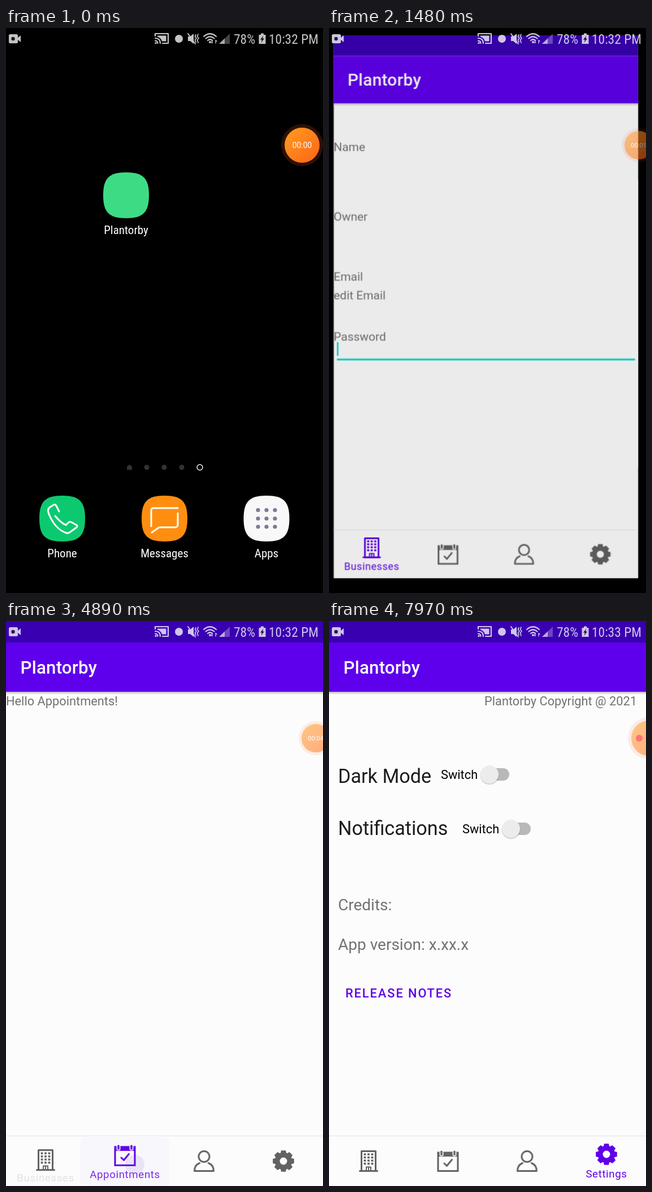
Write an HTML page that moves like this. It is 561 px wide and 998 px high and loops after 8000 ms.

```html
<!DOCTYPE html>
<html lang="en">
<head>
<meta charset="utf-8">
<title>Appointment app demo</title>
<style>
  html, body { margin: 0; width: 100%; height: 100%; overflow: hidden; background: #000; }
  svg { display: block; width: 100vw; height: 100vh; font: 21.8px Roboto, sans-serif; }
  .condensed { font-family: "Roboto Condensed", Roboto, sans-serif; font-stretch: 75%; }
  .line { fill: none; stroke: currentColor; stroke-linecap: round; stroke-linejoin: round; }
  .middle { text-anchor: middle; }
  .end { text-anchor: end; }
  .grey { fill: #727272; }
  .medium { font-weight: 500; }
  #home, #app { transform-origin: 212px 328px; }
  #status { color: #fff; fill: #fff; opacity: .77; }
</style>
</head>
<body>
<svg id="stage" viewBox="0 0 561 998" preserveAspectRatio="none"></svg>
<script>
const LOOP = 8000;
const APP_NAME = 'Plantorby';
const PURPLE = '#5f00e8';
const PAPER = '#fcfcfc';

const text = (x, y, str, cls = 'grey', extra = '') =>
  `<text x="${x}" y="${y}" class="${cls}" ${extra}>${str}</text>`;
const line = (d, width = 3, extra = '') =>
  `<path class="line" d="${d}" stroke-width="${width}" ${extra}/>`;
const rect = (x, y, w, h, fill, extra = '') =>
  `<rect x="${x}" y="${y}" width="${w}" height="${h}" fill="${fill}" ${extra}/>`;
const circle = (x, y, r, fill, extra = '') =>
  `<circle cx="${x}" cy="${y}" r="${r}" fill="${fill}" ${extra}/>`;
const repeat = (list, make) => list.map(make).join('');

// Home screen
const launcher = (x, y, color, label, glyph = '') => `
  <path transform="translate(${x} ${y})" fill="${color}"
    d="M0-40.5C30-40.5 40.5-30 40.5 0S30 40.5 0 40.5-40.5 30-40.5 0-30-40.5 0-40.5Z"/>
  <g color="#fff">${glyph}</g>
  ${text(x, y + 68.5, label, 'condensed middle', 'fill="#fff" font-size="21"')}`;

const phoneGlyph = line('M94 854L89 844Q87 840 83 843L77 847Q72 851 77 861C84 877 95 888 107 892Q111 893 114 890' +
  'L125 882Q128 879 123 877L116 873Q112 871 110 874L106 878Q97 874 87 862');
const messageGlyph = line('M304 848H261Q257 848 257 852V880M304 857V877Q304 882 299 882H271L258 891');
const gridGlyph = repeat([446, 461, 476], x =>
  repeat([851.5, 866.5, 881], y => circle(x, y, 3.6, '#7b7b98')));

const home = `<g id="home">
  ${launcher(212.5, 295.5, '#3ddc84', APP_NAME)}
  <path d="M214 780.500V775L218.500 771 223 775V780.500Z" fill="#333"/>
  ${repeat([249, 280, 311], x => circle(x, 776, 4.5, '#333'))}
  ${circle(343, 776, 4.9, 'none', 'stroke="#eee" stroke-width="1.5"')}
  ${launcher(99.5, 866.5, '#0cc970', 'Phone', phoneGlyph)}
  ${launcher(280.5, 866.5, '#ff8e10', 'Messages', messageGlyph)}
  ${launcher(461, 866.5, '#f8f8f8', 'Apps', gridGlyph)}
</g>`;

// App pages
const toggle = (x, y) => `
  ${rect(x - 14, y - 11, 49, 22, '#b8b8b8', 'rx="11"')}
  ${circle(x, y + 1.5, 16.5, '#000', 'opacity=".16"')}
  ${circle(x, y, 16, '#ececec')}`;
const field = y => rect(6, y, 549, 1.6, '#7c7c7c');
const labels = rows => repeat(rows, ([str, y]) => text(0, y, str));

const pages = [
  labels([['Name', 212.5], ['Owner', 340.5], ['Email', 451], ['edit Email', 485.5], ['Password', 561.5]]) +
    rect(6, 594.3, 549, 3.2, '#03d3ca') + rect(6, 564, 2.6, 25, '#03d3ca', 'id="caret"'),
  labels([['Hello Appointments!', 148.5]]),
  labels([['Name', 212.5], ['Email', 323], ['Password', 434], ['Bio', 551]]) + field(466) + field(618),
  text(545, 148.5, `${APP_NAME} Copyright @ 2021`, 'grey end') +
    text(16, 286, 'Dark Mode', '', 'font-size="34.2" fill="#1c1c1c"') +
    text(16, 378, 'Notifications', '', 'font-size="34.2" fill="#1c1c1c"') +
    text(198, 279, 'Switch', '') + text(236, 375, 'Switch', '') +
    toggle(284, 271) + toggle(322, 367) +
    text(16, 511, 'Credits:', 'grey', 'font-size="28"') +
    text(16, 580.5, 'App version: x.xx.x', 'grey', 'font-size="28"') +
    text(29, 665, 'RELEASE NOTES', 'medium', `fill="${PURPLE}" letter-spacing="1.95"`)
];

// Bottom navigation
const building = line('M-12.500-17.500H12.500V17.500H-12.500Z', 3, 'stroke-linejoin="miter"') +
  line('M-15.500 17.500H15.500', 3) + line('M-4 17V10.500H4V17M0 11V17', 2) +
  repeat([-6.5, 0, 6.5], x => repeat([-12, -6.5, -1, 4.500], y =>
    rect(x - 1.9, y - 1.6, 3.8, 3.4, 'currentColor')));
const calendar = rect(-17.5, -15, 35, 32.5, 'none', 'stroke="currentColor" stroke-width="3"') +
  rect(-18, -16, 36, 8, 'currentColor') +
  repeat([-11.5, 11.5], x => rect(x - 3.5, -19, 7, 10.5, PAPER, 'rx="3.5"') +
    rect(x - 1.8, -18.5, 3.6, 8.5, 'currentColor', 'rx="1.8"')) +
  line('M-6.500 4L-2 8.500 7-2.500', 3);
const person = `<ellipse class="line" cy="-8" rx="9.500" ry="9.500" stroke-width="3"/>` +
  line('M-8 3.500C-14 6-17 11-17 17.500H17C17 11 14 6 8 3.500', 3);
const gear = circle(0, 0, 10.8, 'none', 'stroke="currentColor" stroke-width="8.600"') +
  repeat([0, 45, 90, 135, 180, 225, 270, 315], a =>
    `<path transform="rotate(${a})" d="M-5.500-13L-4-18.800H4L5.500-13Z" fill="currentColor"/>`);

const tabs = [
  { x: 70, label: 'Businesses', icon: building, from: 0, to: 4790 },
  { x: 210.5, label: 'Appointments', icon: calendar, from: 4790, to: 6050, touch: [228, 960] },
  { x: 350.5, label: 'Profile', icon: person, from: 6050, to: 7480, touch: [362, 960] },
  { x: 491, label: 'Settings', icon: gear, from: 7480, to: LOOP, touch: [502, 960] }
];
const tabMarkup = (tab, i) => `
  ${rect(tab.x - 79, 912, 158, 85, PURPLE, `id="ripple${i}" rx="8" opacity="0"`)}
  <g id="tab${i}" transform="translate(${tab.x} 954)">
    <g id="icon${i}">${tab.icon}</g>
    <g id="label${i}">${text(0, 28.5, tab.label, 'middle',
      'fill="currentColor" font-size="18.7" letter-spacing=".62"')}</g>
  </g>`;

const app = `<g id="app">
  ${rect(0, 0, 561, 998, PAPER)}
  ${rect(0, 125, 561, 5, 'url(#shade)')}
  ${rect(0, 0, 561, 38, '#3900b1')}
  ${rect(0, 38, 561, 87, '#5f00ec')}
  ${text(25.5, 93, APP_NAME, 'medium', 'fill="#fff" font-size="31.2" letter-spacing=".25"')}
  ${repeat(pages, (page, i) => `<g id="page${i}">${page}</g>`)}
  ${rect(0, 908.5, 561, 2, '#eeedf5')}
  ${repeat(tabs, tabMarkup)}
  ${repeat(tabs.slice(1), (t, i) => circle(...t.touch, 17, '#7048c8', `id="touch${i + 1}" opacity="0"`))}
</g>`;

// Status bar and recorder bubble
const status = `<g id="status">
  ${rect(5, 11, 16, 16, '#fff', 'rx="2.5"')}<path d="M20 18L26 13V25L20 20Z"/>
  ${circle(12.5, 19, 3.2, '#222')}
  ${line('M264 14V10H287V27H277M264 18Q273 18 273 27M264 22.500Q268.500 22.500 268.500 27', 2.2)}
  <path d="M268 13.500H283.500V23.500H276Q274 17 268 15.500Z"/>${circle(265, 26.5, 1.7, '#fff')}
  ${circle(306, 19, 7, '#fff')}
  <path d="M322 15H326L332 10V28L326 23H322Z"/>
  ${line('M322 10L335 28', 2)}${line('M336 12L334.500 15 337 18 334.500 21 336 25M340 11L338.500 15 341 18 338.500 21 340 26', 1.7)}
  ${line('M350 15Q361 5.500 372 15M353.500 18.500Q361 12 368.500 18.500M357 22Q361 18.500 365 22', 2.2)}
  ${circle(361, 25, 2, '#fff')}${line('M365 21V26.500L363 24.500M371 27V21.500L373 23.500', 1.3)}
  <path d="M377 28L396 10V28Z" opacity=".35"/><path d="M377 28L387 18.500V28Z" opacity=".8"/>
  ${text(403, 28, '78%', 'condensed', 'font-size="23.5"')}
  <path d="M447.500 12H451V9.500H456V12H459.500V28H447.500Z"/>
  <path d="M455.500 13.500L450 20.500H453L451.500 26 457 18.500H454Z" fill="#111"/>
  ${text(553, 28, '10:32 PM', 'condensed end', 'id="clock0" font-size="23.5"')}
  ${text(553, 28, '10:33 PM', 'condensed end', 'id="clock1" font-size="23.5"')}
</g>`;

const ticks = [0, 1200, 2280, 3440, 4560, 5100];
const bubble = `<g id="bubble">
  ${circle(0, 0, 37, '#ff5a28', 'opacity=".18"')}
  ${circle(0, 0, 31, 'url(#orange)')}
  ${repeat(ticks.slice(0, -1), (_, i) =>
    text(0, 5, `00:0${i}`, 'middle', `id="timer${i}" fill="#fff" font-size="13.8"`))}
  ${circle(-17, 0, 6, '#ff0010', 'id="record"')}
</g>`;

document.getElementById('stage').innerHTML = `
  <defs>
    <linearGradient id="orange" x2="1" y2="1"><stop stop-color="#ff9c20"/><stop offset="1" stop-color="#ff6418"/></linearGradient>
    <linearGradient id="shade" x2="0" y2="1"><stop stop-color="#bbb"/><stop offset="1" stop-color="${PAPER}"/></linearGradient>
  </defs>
  ${home}${circle(201, 296, 16, '#fff', 'id="touch0" opacity="0"')}${app}${status}${bubble}`;

// Motion: each step is [time, properties]; both ends are held.
function track(id, steps, easing = 'linear') {
  const held = [...steps];
  if (held[0][0] > 0) held.unshift([0, held[0][1]]);
  if (held.at(-1)[0] < LOOP) held.push([LOOP, held.at(-1)[1]]);
  const frames = held.map(([time, props]) => ({ ...props, offset: time / LOOP, easing }));
  document.getElementById(id).animate(frames, { duration: LOOP, iterations: Infinity });
}
function show(id, ...spans) {
  const steps = spans.flatMap(([from, to]) => [[from, { opacity: 1 }], [to, { opacity: 0 }]]);
  if (spans[0][0] > 0) steps.unshift([0, { opacity: 0 }]);
  track(id, steps.filter(([time]) => time < LOOP), 'steps(1, end)');
}
const fade = (id, points) => track(id, points.map(([time, opacity]) => [time, { opacity }]));
const zoom = (id, points) => track(id, points.map(([time, scale, opacity]) =>
  [time, { transform: `scale(${scale})`, opacity }]));

zoom('home', [[1250, 1, 1], [1410, 1.42, .4], [1490, 1.55, 0]]);
zoom('app', [[1250, .65, 0], [1330, .82, .35], [1410, .92, .7], [1500, .972, 1], [1660, 1, 1]]);
fade('touch0', [[1080, 0], [1150, .16], [1200, .16], [1260, 0]]);

track('bubble', [[870, 524, 1, 1], [1160, 541, .865, .62], [1280, 548, .81, .55], [5100, 548, .81, .55], [5340, 566, 1, .55]]
  .map(([time, x, scale, opacity]) => [time, { transform: `translate(${x}px, 207px) scale(${scale})`, opacity }]));
ticks.slice(0, -1).forEach((from, i) => show('timer' + i, [from, ticks[i + 1]]));
show('record', [5100, LOOP]);
show('clock0', [0, 5400]);
show('clock1', [5400, LOOP]);
show('caret', [1480, 1700], [2210, 2680], [3190, 3690], [4200, 4700]);

const SHIFT = 120;
tabs.forEach(({ from, to, touch }, i) => {
  const pose = (rise, tone) => ({
    icon: { transform: `translateY(${-12 * rise}px)` },
    label: { transform: `translateY(${9 * (1 - rise)}px)`, opacity: rise },
    tab: { color: tone }
  });
  const off = pose(0, '#626262'), on = pose(1, PURPLE);
  for (const part of ['icon', 'label']) {
    const steps = from ? [[from, off[part]], [from + SHIFT, on[part]]] : [[0, on[part]]];
    if (to < LOOP) steps.push([to, on[part]], [to + SHIFT, off[part]]);
    track(part + i, steps);
  }
  const tones = from ? [[0, off.tab], [from, on.tab]] : [[0, on.tab]];
  if (to < LOOP) tones.push([to, off.tab]);
  track('tab' + i, tones, 'steps(1, end)');
  show('page' + i, [from, to]);
  if (touch) {
    fade('touch' + i, [[from - 170, 0], [from - 110, .15], [from + 80, .13], [from + 190, 0]]);
    fade('ripple' + i, [[from - 60, 0], [from + 40, .03], [from + 100, .018], [from + 330, 0]]);
  }
});
</script>
</body>
</html>
```
